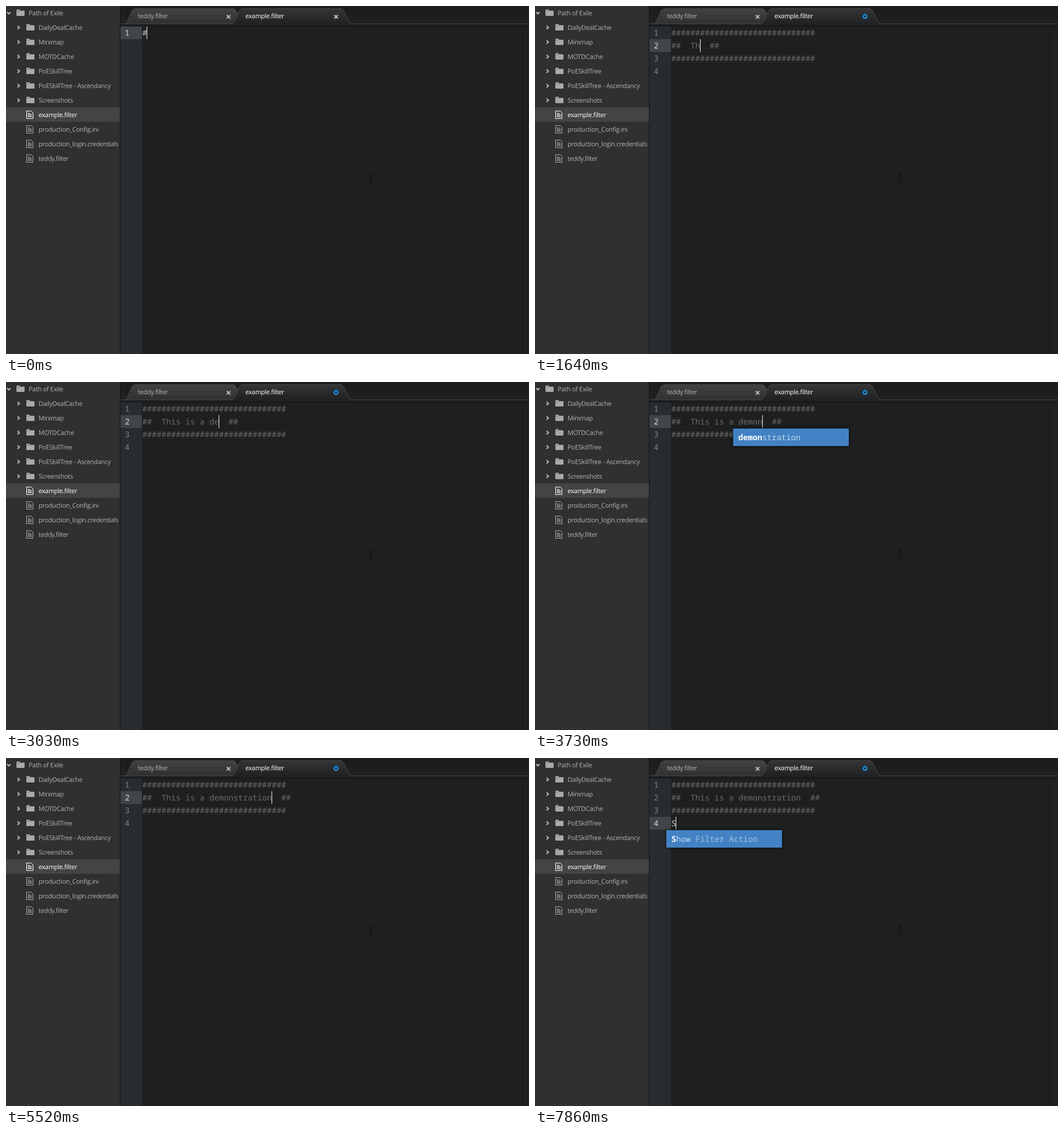
Write an HTML page that moves like this. It is 900 by 598 pixels and loops after 8000 ms.

```html
<!DOCTYPE html>
<html lang="en">
<head>
<meta charset="utf-8">
<title>Editor snippets</title>
<style>
  html, body { margin: 0; width: 100%; height: 100%; overflow: hidden; background: #1d1f21; }
  svg { display: block; width: 900px; height: 598px; }
  text { white-space: pre; text-rendering: geometricPrecision; }
  .ui { font: 11px "Open Sans", "Noto Sans", sans-serif; letter-spacing: -.3px; fill: #b2b2b2; }
  .ui.on { fill: #fff; }
  .code { font: 13.75px "Noto Sans Mono", "DejaVu Sans Mono", monospace; fill: #6b6b6b; }
  .num { fill: #80837d; }
  .num.on { fill: #d8d8d8; }
  .lit { fill: #c5c8c6; }
  #pop { filter: drop-shadow(0 0 3px rgba(0, 0, 0, .6)); }
  #pop .hit { font-weight: 700; fill: #fff; }
  #pop .rest { font-weight: 500; fill: #c3d8ee; }
  #pop .label { fill: #a3c3e4; }
</style>
</head>
<body>
<svg id="stage" viewBox="0 0 900 598" xmlns="http://www.w3.org/2000/svg">
  <defs>
    <linearGradient id="bar" x2="0" y2="1"><stop stop-color="#1c1c1c"/><stop offset="1" stop-color="#202020"/></linearGradient>
    <linearGradient id="idle" x2="0" y2="1"><stop stop-color="#424242"/><stop offset="1" stop-color="#303030"/></linearGradient>
    <linearGradient id="live" x2="0" y2="1"><stop stop-color="#343536"/><stop offset="1" stop-color="#1f2123"/></linearGradient>
    <path id="tab" d="M203 31 Q207 30 209 26 L217 8 Q219 4.500 223 4.500 H390 Q394 4.500 396 8 L404 26 Q406 30 410 31"/>
    <path id="folder" d="M0 1 Q0 0 1 0 H5 Q6 0 6 1 V2 H13 Q14 2 14 3 V10 Q14 11 13 11 H1 Q0 11 0 10 Z M1 2 V2.600 H5 V2 Z" fill="#a9a9a7" fill-rule="evenodd"/>
    <g id="file" fill="none" stroke-width="1"><path d="M.5 .5 H8.500 L11.500 3.500 V13.500 H.5 Z"/><path d="M2.500 4.500 H7 M2.500 6.500 H9.500 M2.500 8.500 H9.500 M2.500 10.500 H9.500"/></g>
    <path id="cross" d="M-3 -3 L3 3 M3 -3 L-3 3" stroke-width="2"/>
  </defs>

  <rect width="900" height="598" fill="#1d1f21"/>
  <rect x="197" y="35" width="37" height="563" fill="#282c2f"/>
  <rect x="893" y="35" width="1" height="563" fill="#292b2d"/>

  <rect x="197" width="703" height="31" fill="url(#bar)"/>
  <rect x="197" y="30" width="703" height="1" fill="#424446"/>
  <rect x="197" y="31" width="703" height="4" fill="#1f2123"/>
  <rect x="197" y="34" width="703" height="1" fill="#131415"/>
  <use href="#tab" fill="url(#idle)" stroke="#484848"/>
  <rect x="197" y="30" width="200" height="1" fill="#424446"/>
  <use href="#tab" x="185" fill="url(#live)" stroke="#464849"/>
  <rect x="390" y="31" width="204" height="2" fill="#1f2123"/>
  <text class="ui" x="227" y="21">teddy.filter</text>
  <text class="ui on" x="412" y="21">example.filter</text>
  <use href="#cross" x="383" y="18.500" stroke="#b9b9b0"/>
  <use id="close" href="#cross" x="568" y="18.500" stroke="#c6c6c6"/>
  <circle id="dirty" cx="568" cy="18" r="3.200" fill="none" stroke="#1093ec" stroke-width="2.200"/>

  <g id="tree">
    <rect width="196" height="598" fill="#303030"/>
    <rect x="196" width="1" height="598" fill="#131313"/>
    <rect y="174" width="196" height="25" fill="#444"/>
  </g>

  <rect id="active" x="197" width="37" height="22" fill="#414548"/>
  <rect id="select" x="267" y="57" width="181" height="22" fill="#444"/>
  <g id="lines"></g>
  <rect id="caret" width="1" height="22" fill="#f4f4f4"/>
  <g id="pop">
    <rect width="199" height="30" rx="1" fill="#4282c4"/>
    <text class="code" x="8.750" y="20"><tspan class="hit"></tspan><tspan class="rest"></tspan><tspan class="label"></tspan></text>
  </g>
  <path d="M625 288.500 H627 M628 288.500 H630 M627.500 289 V303 M625 303.500 H627 M628 303.500 H630" stroke="#08090a" fill="none"/>
</svg>
<script>
const LOOP = 8000, LEFT = 234.5, CHAR = 8.25, TOP = 35, ROW = 22;
const $ = id => document.getElementById(id);

function add(parent, tag, attrs, text = '') {
  const el = document.createElementNS('http://www.w3.org/2000/svg', tag);
  for (const k in attrs) el.setAttribute(k, attrs[k]);
  el.textContent = text;
  return parent.appendChild(el);
}
const show = (el, on) => el.setAttribute('visibility', on ? 'visible' : 'hidden');
const place = (el, x, y) => { el.setAttribute('x', x); el.setAttribute('y', y); };

// Project tree
const folders = ['Path of Exile', 'DailyDealCache', 'Minimap', 'MOTDCache', 'PoESkillTree',
  'PoESkillTree - Ascendancy', 'Screenshots'];
const files = ['example.filter', 'production_Config.ini', 'production_login.credentials', 'teddy.filter'];
[...folders, ...files].forEach((name, i) => {
  const y = 12 + 25 * i, tree = $('tree'), on = name === files[0];
  if (i < folders.length) {
    const d = i ? `M20 ${y - 3} l3 3 -3 3` : `M2 ${y - 1.5} l3 3 3 -3`;
    add(tree, 'path', { d, fill: 'none', stroke: '#b5b5b0', 'stroke-width': 2 });
    add(tree, 'use', { href: '#folder', x: i ? 35 : 18, y: y - 6 });
  } else {
    add(tree, 'use', { href: '#file', x: 35, y: y - 7, stroke: on ? '#fff' : '#adada8' });
  }
  add(tree, 'text', { class: on ? 'ui on' : 'ui', x: i ? 56 : 39, y: y + 4 }, name);
});

// Code rows: number and content
const rows = [1, 2, 3, 4].map(n => {
  const y = TOP + ROW * n - 6;
  return {
    num: add($('lines'), 'text', { class: 'code num', x: 204.5, y }, n),
    body: add($('lines'), 'text', { class: 'code', x: LEFT, y })
  };
});

// Each step changes part of the state. pop: [row, column, match, rest, label]
const type = (typed, pop) => ({ typed, row: 2, col: 4 + typed.length, ...(pop !== undefined && { pop }) });
const hint = n => [2, 14, 'demonstration'.slice(0, n), 'demonstration'.slice(n), ''];
const demo = (n, hit) => type('This is a ' + 'demonstration'.slice(0, n), hit ? hint(hit) : null);

const steps = [
  [0, { full: false, dirty: false, first: '#', last: '', typed: null, row: 1, col: 1, caret: true, pop: null }],
  [60, { pop: [1, 0, '#', '', ' Heading'] }],
  [290, { dirty: true }],
  [770, { full: true, row: 2, caret: false, pop: null }],
  [1470, { ...type('T'), caret: true }],
  [1640, type('Th')],
  [1790, type('Thi')],
  [1860, type('This', [2, 4, 'Thi', 's', ''])],
  [1930, type('This ', null)],
  [2170, type('This i')],
  [2260, type('This is')],
  [2490, type('This is ')],
  [2630, type('This is a')],
  [2800, type('This is a ')],
  [2940, demo(1)],
  [3030, demo(2)],
  [3350, demo(3)],
  [3420, demo(3, 3)],
  [3500, demo(4, 3)],
  [3570, demo(4, 4)],
  [3730, demo(5, 5)],
  [3960, demo(6, 5)],
  [4040, demo(6, 6)],
  [4190, demo(7, 6)],
  [4270, demo(8, 7)],
  [4350, demo(8, 8)],
  [4740, demo(9, 8)],
  [4820, demo(9, 9)],
  [5060, demo(10, 9)],
  [5140, demo(11, 10)],
  [5210, demo(12, 11)],
  [5290, demo(12, 12)],
  [5520, demo(13)],
  [5990, { caret: false }],
  [6220, { caret: true, col: 31 }],
  [6680, { row: 3, col: 30, lag: 2 }],
  [6760, { lag: 0 }],
  [6910, { row: 4, col: 0 }],
  [7460, { caret: false }],
  [7780, { caret: true, last: 'S', col: 1 }],
  [7860, { pop: [4, 0, 'S', 'how', ' Filter Action'] }]
];

function draw(s) {
  const rule = '#'.repeat(30);
  const blank = s.typed === null;
  const middle = blank ? ' '.repeat(8) + 'Heading' + ' '.repeat(7) : s.typed;
  const content = s.full ? [rule, `##  ${middle}  ##`, rule, s.last] : [s.first, '', '', ''];
  const active = s.lag || s.row;
  rows.forEach(({ num, body }, i) => {
    body.textContent = content[i];
    body.classList.toggle('lit', !s.full || i === 3);
    num.classList.toggle('on', i + 1 === active);
    show(num, s.full || i === 0);
  });
  $('active').setAttribute('y', TOP + ROW * (active - 1));
  show($('select'), s.full && blank);
  show($('close'), !s.dirty);
  show($('dirty'), s.dirty);
  place($('caret'), Math.floor(LEFT + CHAR * s.col), TOP + ROW * (s.row - 1));
  show($('caret'), s.caret);
  show($('pop'), s.pop);
  if (s.pop) {
    const [row, col, ...parts] = s.pop;
    const x = Math.round(LEFT + CHAR * col - 8.75);
    $('pop').setAttribute('transform', `translate(${x} ${TOP + ROW * row + 1})`);
    $('pop').querySelectorAll('tspan').forEach((el, i) => { el.textContent = parts[i]; });
  }
}

let shown = -1;
function tick(now) {
  const t = now % LOOP;
  const n = steps.filter(step => step[0] <= t).length;
  if (n !== shown) {
    shown = n;
    draw(Object.assign({}, ...steps.slice(0, n).map(step => step[1])));
  }
}
const start = performance.now();
function frame() {
  tick(performance.now() - start);
  requestAnimationFrame(frame);
}
frame();
</script>
</body>
</html>
```
